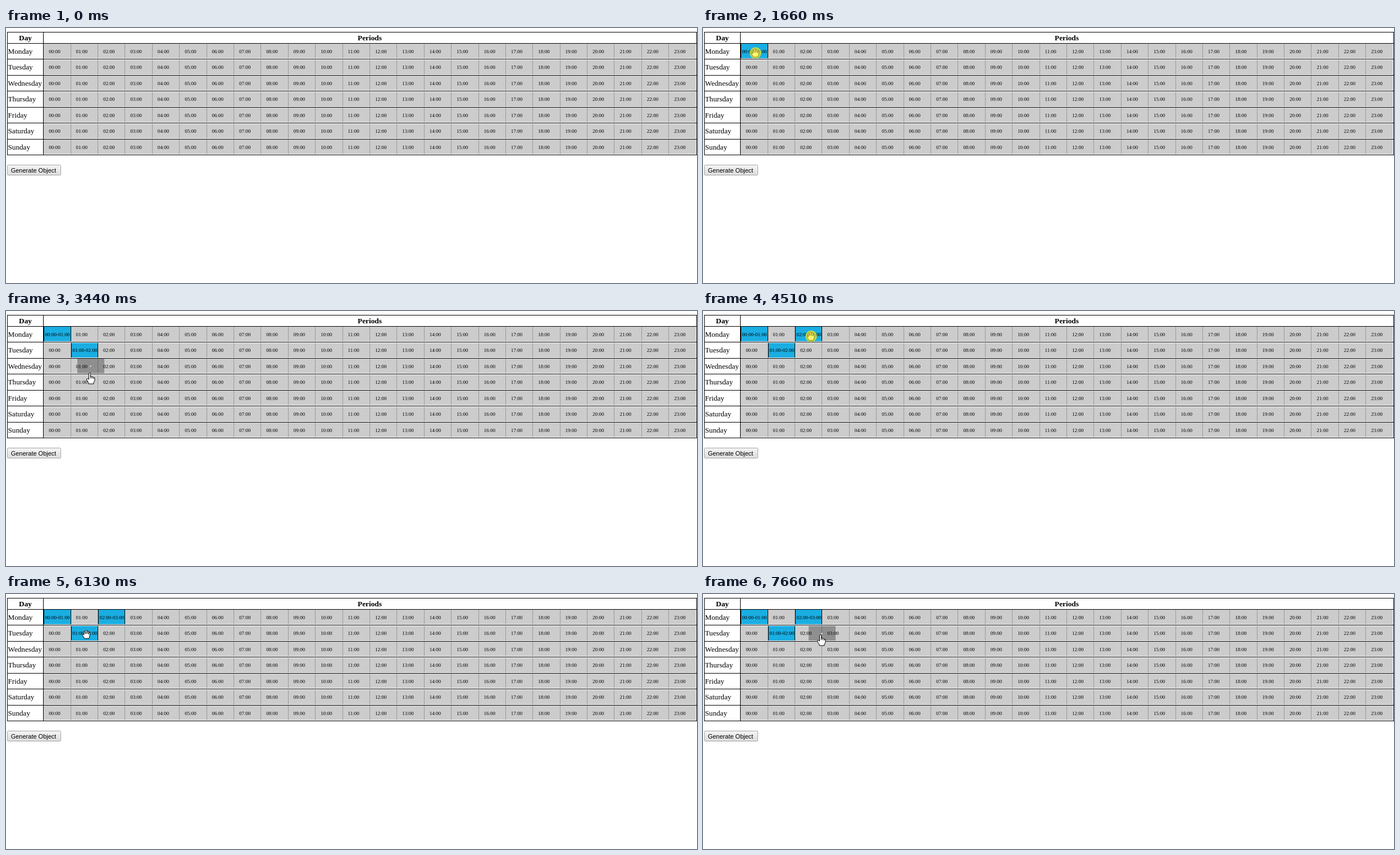
Write an HTML page with a canvas that moves like this. It is 1230 px wide and 455 px high and loops after 8 s.

```html
<!DOCTYPE html>
<html lang="en">
<head>
<meta charset="utf-8">
<style>
  html, body { margin: 0; width: 100%; height: 100%; overflow: hidden; background: #fff; }
  canvas { display: block; }
</style>
</head>
<body>
<canvas id="stage" width="1230" height="455"></canvas>
<script>
const ctx = document.getElementById('stage').getContext('2d');
const LOOP = 8000, STEP = 75;
const LEFT = 67, RIGHT = 1229, ROW = 28.43, HOUR = 48.39;
const SERIF = '"Liberation Serif", serif';
const DAYS = ['Monday', 'Tuesday', 'Wednesday', 'Thursday', 'Friday', 'Saturday', 'Sunday'];

// Cursor travel: start time, number of steps, x, y reached
const START = [532, 423];
const MOVES = [
  [270, 6, 152, 98], [810, 1, 115, 69], [890, 3, 94, 51], [1200, 1, 94, 45],
  [1660, 1, 93, 44.5], [2130, 2, 136, 50], [2280, 3, 128, 76], [2670, 2, 140, 71],
  [3130, 1, 147, 79], [3210, 4, 149, 110], [3820, 2, 180, 88], [3980, 3, 192, 45],
  [4820, 1, 192, 50], [4900, 3, 181, 92], [5130, 2, 164, 95], [5280, 2, 162, 75],
  [5590, 2, 145, 72], [6130, 1, 143, 72], [6510, 1, 138, 80], [6590, 4, 103, 101],
  [7200, 4, 180, 96], [7510, 3, 209, 72]
];

// Clicks that book an hour; flash is how long the click marker stays
const BOOKINGS = [
  { at: 1660, day: 0, hour: 0, flash: 170 },
  { at: 2900, day: 1, hour: 1, flash: 80 },
  { at: 4510, day: 0, hour: 2, flash: 80 }
];

const ARROW = new Path2D('M0 0V16L4 12.5 6.5 18.5 9 17.5 6.5 11.5H11.5Z');
const POINTER = new Path2D('M-1.5 1.5Q0-.5 1.5 1.5V7Q3 5.8 4 7.5Q5.5 6.5 6.8 8.5Q9 7.8 9 10V14L7 18V20H-2V18L-5.5 13Q-6 10.5-3.5 10.5L-1.5 12ZM1.5 7V10M4 7.5V10.5M6.8 8.5V11');
const PALM = new Path2D('M-3 7.5L-7 1.5Q-7.5-.5-5 0L-4 1L-5-4.5Q-4-6.5-2.5-4.5L-2-1V-6.5Q-.5-8.5 1-6.5V-1L1.5-6Q3.2-7 4-5V0L5-3.5Q6.8-4.5 7-2.5L6 3L4.5 7.5Z');

const lineY = row => Math.round(27 + ROW * row);
const rowTop = row => Math.ceil(28 + ROW * row);
const rowHeight = row => lineY(row + 1) - 1 - rowTop(row);
const divider = hour => Math.floor(66.8 + HOUR * hour);
const clock = hour => String(hour).padStart(2, '0') + ':00';

function rect(x, y, w, h, color) {
  ctx.fillStyle = color;
  ctx.fillRect(x, y, w, h);
}

function label(text, x, y, font, align = 'left') {
  ctx.font = font;
  ctx.textAlign = align;
  ctx.fillStyle = '#000';
  ctx.fillText(text, x, y);
}

function drawTable(booked) {
  label('Day', 34.5, 21.5, `bold 13.3px ${SERIF}`, 'center');
  label('Periods', 647.5, 21.5, `bold 13.3px ${SERIF}`, 'center');
  DAYS.forEach((name, row) => {
    const top = rowTop(row), height = rowHeight(row), base = 45 + ROW * row;
    label(name, 3.5, base + 1, `13.2px ${SERIF}`);
    rect(LEFT, top, RIGHT - 1 - LEFT, height, '#ccc');
    for (let hour = 0; hour < 24; hour++) {
      const x = divider(hour) + 1, end = divider(hour + 1);
      if (hour < 23) rect(end, top, 1, height, '#999');
      if (booked.some(b => b.day === row && b.hour === hour)) {
        rect(x, top, end + 1 - x, height, '#000');
        rect(x + 1, top, end - 1 - x, height, '#1aaee2');
        label(`${clock(hour)}-${clock(hour + 1)}`, x + 2.5, base, `9px ${SERIF}`);
      } else {
        label(clock(hour), 76.2 + HOUR * hour, base, `9px ${SERIF}`);
      }
    }
  });
  rect(2, 7, 1228, 1, '#000');
  for (let row = 0; row <= 7; row++) rect(2, lineY(row), 1228, 1, '#000');
  for (const x of [2, 66, RIGHT]) rect(x, 7, 1, 220, '#000');
}

function drawButton() {
  const shade = ctx.createLinearGradient(0, 244, 0, 263);
  shade.addColorStop(0, '#f6f6f6');
  shade.addColorStop(1, '#dcdcdc');
  ctx.fillStyle = shade;
  ctx.strokeStyle = '#a6a6a6';
  ctx.lineWidth = 1;
  ctx.beginPath();
  ctx.roundRect(2.5, 244.5, 95, 18, 1);
  ctx.fill();
  ctx.stroke();
  label('Generate Object', 8.7, 258, '11px "Liberation Sans", sans-serif');
}

function cursorAt(t) {
  let [x, y] = START;
  for (const [start, steps, toX, toY] of MOVES) {
    if (t < start) break;
    const p = Math.min(steps, Math.floor((t - start) / STEP) + 1) / steps;
    x += (toX - x) * p;
    y += (toY - y) * p;
  }
  return [Math.round(x), y];
}

function drawHover(x, row) {
  const quarter = Math.max(0, Math.min(92, Math.round((x - LEFT - HOUR / 2) / (HOUR / 4))));
  const left = Math.round(LEFT + quarter * HOUR / 4), top = rowTop(row);
  rect(left, top, 48, rowHeight(row), 'rgba(0,0,0,.3)');
  rect(left + 22, top + 13, 3, 1, '#ddd');
  rect(left + 23, top + 12, 1, 3, '#ddd');
}

function drawCursor(shape, x, y, flash) {
  ctx.save();
  ctx.translate(x, y);
  if (flash) {
    ctx.fillStyle = 'rgba(232,226,40,.78)';
    ctx.beginPath();
    ctx.arc(.5, 0, 10.3, 0, 7);
    ctx.fill();
  }
  ctx.fillStyle = flash ? '#fbf86a' : '#fff';
  ctx.strokeStyle = flash ? '#85812a' : '#000';
  ctx.lineWidth = 1;
  ctx.lineJoin = 'round';
  ctx.fill(shape);
  ctx.stroke(shape);
  ctx.restore();
}

function draw(t) {
  const booked = BOOKINGS.filter(b => t >= b.at);
  rect(0, 0, 1230, 455, '#fff');
  drawTable(booked);
  drawButton();
  if (t >= MOVES[0][0]) {
    const [x, y] = cursorAt(t);
    const row = Math.floor((y - 27) / ROW);
    const inTable = row >= 0 && row < 7 && x >= LEFT && x < RIGHT;
    const onBooking = booked.some(b => b.day === row && x > divider(b.hour) && x <= divider(b.hour + 1));
    if (inTable && !onBooking) drawHover(x, row);
    const shape = onBooking ? PALM : inTable ? POINTER : ARROW;
    drawCursor(shape, x, y, booked.some(b => t < b.at + b.flash));
  }
}

function tick() {
  draw(performance.now() % LOOP);
  requestAnimationFrame(tick);
}
tick();
</script>
</body>
</html>
```
